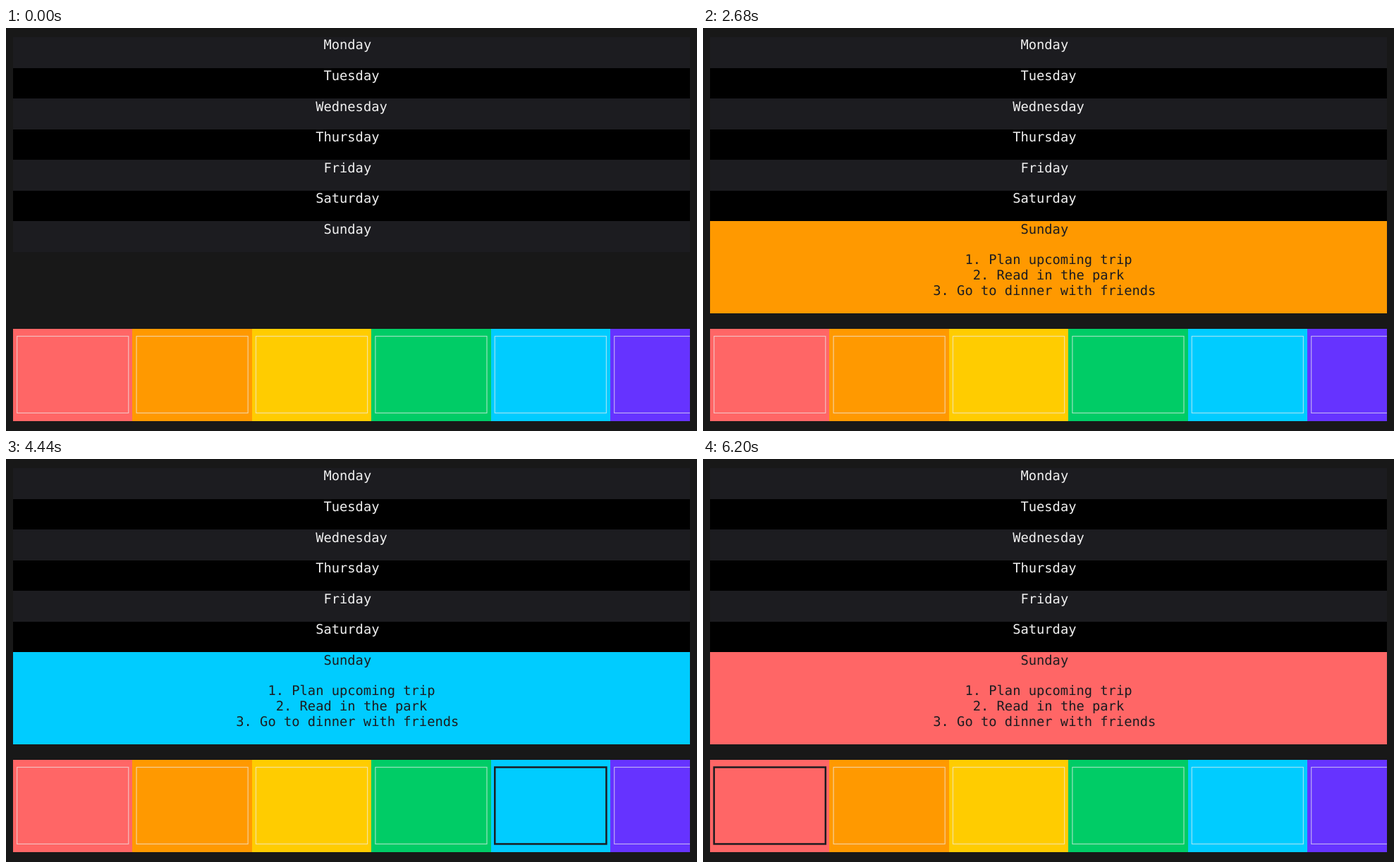
Write an HTML page that moves like this. It is 980 by 572 pixels and loops after 7.36 s.

```html
<!DOCTYPE html>
<html lang="en">
<head>
<meta charset="utf-8">
<title>Week planner</title>
<style>
  html, body { margin: 0; width: 100%; height: 100%; overflow: hidden; background: #181818; }
  svg { display: block; width: 100vw; height: 100vh; }
  rect { shape-rendering: crispEdges; }
  text { font: 18.76px "DejaVu Sans Mono", monospace; text-rendering: geometricPrecision; }
  .frame { fill: none; shape-rendering: auto; }
</style>
</head>
<body>
<svg viewBox="0 0 980 572" xmlns="http://www.w3.org/2000/svg">
  <clipPath id="strip"><rect x="10" y="420" width="960" height="145"/></clipPath>
  <g id="days"></g>
  <g clip-path="url(#strip)"><g id="swatches"></g></g>
</svg>
<script>
const LOOP = 7360;
const COLS = 85, CELL = 960 / COLS, LINE = 21.785;
const LEFT = 10, TOP = 13, STRIP_LINE = 19, SWATCH_COLS = 15;
const INK = '#1c1c20', PAPER = '#f0f0f0';

const week = [
  ['Monday', 'Exercise for 30 minutes', 'Work on the project for 2 hours', 'Read a book for 1 hour'],
  ['Tuesday', 'Attend a team meeting at 10 AM', 'Reply to emails', 'Prepare lunch'],
  ['Wednesday', 'Update work tasks', 'Conduct code review', 'Attend a training'],
  ['Thursday', 'Brainstorm for an upcoming project', 'Document ideas and refine tasks'],
  ['Friday', 'Have a one-on-one with a team lead', 'Attend demo talk', 'Go running for 1 hour'],
  ['Saturday', 'Work on coding project', 'Read a chapter from a book', 'Go for a short walk'],
  ['Sunday', 'Plan upcoming trip', 'Read in the park', 'Go to dinner with friends']
];
const colors = ['#ff6666', '#ff9900', '#ffcc00', '#00cc66', '#00ccff',
                '#6633ff', '#ff33cc', '#33ffff', '#66ff66', '#ff66ff'];

// Key presses: seven through the days, then through the swatches, wrapping at the end.
const presses = [880, 1200, 1480, 1760, 2080, 2360, 2680,
                 3280, 3560, 3840, 4120, 4440, 4720, 5000, 5280, 5600, 5880, 6200];

const daysEl = document.getElementById('days');
const swatchesEl = document.getElementById('swatches');

const px = col => LEFT + col * CELL;
const py = line => TOP + line * LINE;

function box(col, line, cols, lines, fill) {
  return `<rect x="${px(col)}" y="${py(line)}" width="${cols * CELL}" height="${lines * LINE}" fill="${fill}"/>`;
}

function label(str, line, fill) {
  const col = Math.floor((COLS - str.length) / 2);
  return `<text x="${px(col)}" y="${py(line) + 17.4}" fill="${fill}">${str}</text>`;
}

function drawDays(active, accent) {
  let line = 0, out = '';
  week.forEach(([name, ...tasks], i) => {
    const open = i === active;
    const height = open ? tasks.length + 3 : 2;
    const ink = open ? INK : PAPER;
    out += box(0, line, COLS, height, open ? accent : i % 2 ? '#000' : '#1c1c20');
    out += label(name, line, ink);
    if (open) tasks.forEach((task, n) => out += label(`${n + 1}. ${task}`, line + 2 + n, ink));
    line += height;
  });
  daysEl.innerHTML = out;
}

function drawSwatches(active) {
  const scroll = Math.max(0, (active + 1) * SWATCH_COLS - COLS);
  swatchesEl.innerHTML = colors.map((color, i) => {
    const col = i * SWATCH_COLS - scroll;
    const stroke = i === active
      ? `stroke="${INK}" stroke-width="2.5"`
      : `stroke="#eee" stroke-opacity=".65" stroke-width="1.2"`;
    return box(col, STRIP_LINE, SWATCH_COLS, 6, color) +
      `<rect class="frame" x="${px(col + .5)}" y="${py(STRIP_LINE + .5) - .3}" ` +
      `width="${(SWATCH_COLS - 1) * CELL}" height="${5 * LINE}" ${stroke}/>`;
  }).join('');
}

let shown = -1;
function render(ms) {
  const step = presses.filter(p => p <= ms).length;
  if (step === shown) return;
  shown = step;
  const day = Math.min(step, week.length) - 1;
  const swatch = step > week.length ? (step - week.length - 1) % colors.length : -1;
  drawDays(day, swatch < 0 ? colors[1] : colors[swatch]);
  drawSwatches(swatch);
}

const start = performance.now();
function tick() {
  render((performance.now() - start) % LOOP);
  requestAnimationFrame(tick);
}
tick();
</script>
</body>
</html>
```
